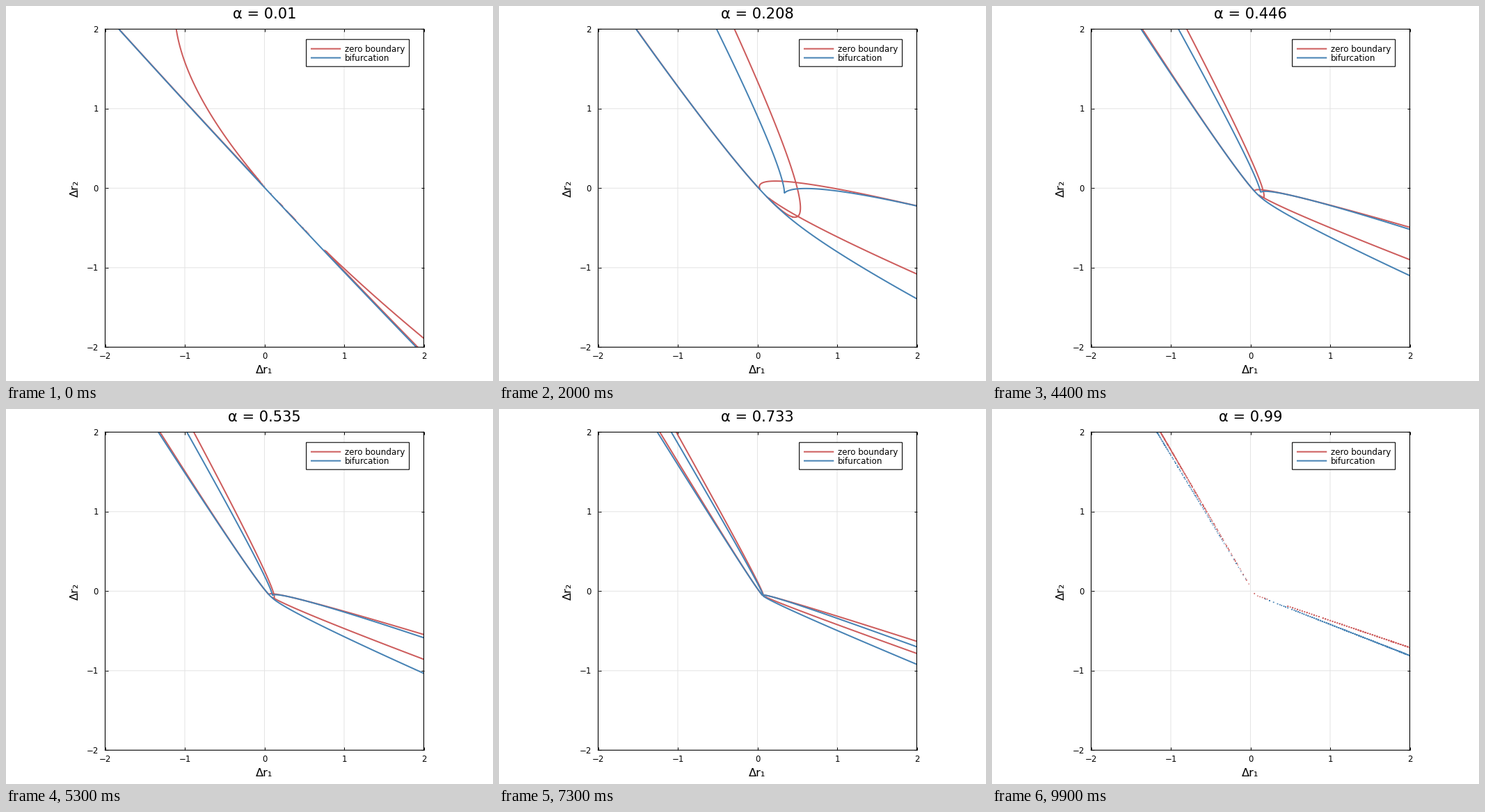
Write a matplotlib script that moves like this. It is 700x540 px and loops after 10 s.

```python
import numpy as np
import matplotlib.pyplot as plt
from matplotlib.animation import FuncAnimation
from matplotlib.patches import Rectangle
from matplotlib.lines import Line2D

W, H, DPI = 700, 540, 100
FRAMES, INTERVAL = 100, 100
RED, BLUE = "#cd5c5c", "#4682b4"
PT = 72 / DPI
CX, CY, UNIT = 371.5, 262.3, 114.5  # pixel of the plot's origin, pixels per unit

plt.rcParams["path.snap"] = False
plt.rcParams["path.simplify"] = False

# Growth rates as a quadratic map of the abundances (s, t):
# r = P0 + (1-alpha) * (A s + B t) + alpha * (AA s^2 + BB t^2 + AB s t)
P0 = np.array([0.0613, -0.05])
A, B = np.array([0.607, -0.648]), np.array([-0.2202, 0.2505])
AA, BB = np.array([-0.581, 1.0]), np.array([1.0, -0.34])
AB = np.array([-0.66, 0.66])

grid = np.linspace(-2, 2, 401)
X, Y = np.meshgrid(grid, grid)


def cross(p, q):
    return p[0] * q[1] - p[1] * q[0]


def parabola(lin, quad, r):
    """Zero on the curve lin*s + quad*s^2."""
    return cross(lin, r) * cross(lin, quad) - cross(quad, r) ** 2


def pencil():
    """Coefficients of det(M1 + z M2) for the pencil of the two conics."""
    mul = np.convolve
    a, b, c = A / 2, B / 2, AB / 2
    minor = mul(AA, BB) - mul(c, c)
    rest = 2 * mul(mul(c, a), b) - mul(AA, mul(b, b)) - mul(BB, mul(a, a))
    return minor, rest


MINOR, REST = pencil()


def fold(r):
    """Discriminant of the pencil: zero where two equilibria merge."""
    u, v = r
    n, k = MINOR, REST
    d = k[0] - u * n[0]
    c = k[1] - u * n[1] - v * n[0]
    b = k[2] - u * n[2] - v * n[1]
    a = k[3] - v * n[2]
    bb, cc, ad = b * b, c * c, a * d
    return (18 * ad * b * c - 4 * bb * b * d + bb * cc
            - 4 * a * cc * c - 27 * ad * ad)


fig = plt.figure(figsize=(W / DPI, H / DPI), dpi=DPI, facecolor="white")
ax = fig.add_axes([(CX - 2 * UNIT) / W, 1 - (CY + 2 * UNIT) / H,
                   4 * UNIT / W, 4 * UNIT / H])
ax.set_xlim(-2, 2)
ax.set_ylim(-2, 2)
ticks = range(-2, 3)
ax.set_xticks(ticks)
ax.set_yticks(ticks)
ax.tick_params(direction="in", top=True, right=True, length=4 * PT,
               width=PT, labelbottom=False, labelleft=False)
ax.set_axisbelow(True)
ax.grid(color="#e4e4e4", linewidth=PT)
for spine in ax.spines.values():
    spine.set_linewidth(1.1 * PT)
    spine.set_snap(False)
for line in (ax.get_xgridlines() + ax.get_ygridlines()
             + ax.get_xticklines() + ax.get_yticklines()):
    line.set_snap(False)


def label(x, y, text, size, ha="center", **kw):
    """Text with its baseline at pixel (x, y), measured from the top left."""
    return fig.text(x / W, 1 - y / H, text, fontsize=size * PT, ha=ha,
                    va="baseline", family="DejaVu Sans", color="black", **kw)


for i in ticks:
    name = str(i).replace("-", "\u2212")
    label(CX + UNIT * i, 507.5, name, 11.8)
    label(133, CY + 4.3 - UNIT * i, name, 11.8, ha="right")

title = label(CX, 18, "", 21)
label(CX, 529, "Δr₁", 16.3)
label(103.5, CY, "Δr₂", 16.3, rotation=90, rotation_mode="anchor")

# Legend
fig.add_artist(Rectangle((431.6 / W, 1 - 87.2 / H), 148 / W, 39 / H, fc="white",
                         ec="black", lw=1.1 * PT, zorder=5, snap=False))
for y, color, name in ((61.6, RED, "zero boundary"), (74.6, BLUE, "bifurcation")):
    fig.add_artist(Line2D([438 / W, 481.3 / W], [1 - y / H] * 2, color=color,
                          lw=2 * PT, solid_capstyle="butt", zorder=6, snap=False))
    label(486.6, y + 4.4, name, 11.87, ha="left", zorder=6)

curves = []


def update(i):
    while curves:
        curves.pop().remove()
    alpha = 0.01 + 0.98 * i / (FRAMES - 1)
    scale = (1 - alpha) ** 2 / alpha
    r = (X - P0[0]) / scale, (Y - P0[1]) / scale
    zero = parabola(A, AA, r) * parabola(B, BB, r)
    for z, color in ((zero, RED), (fold(r), BLUE)):
        cs = ax.contour(grid, grid, z, levels=[0], colors=color,
                        linewidths=2 * PT, linestyles="solid", zorder=2.2)
        cs.set(joinstyle="round", capstyle="round")
        curves.append(cs)
    title.set_text(f"α = {round(alpha, 3)}")
    return []


anim = FuncAnimation(fig, update, frames=FRAMES, interval=INTERVAL,
                     repeat=True, repeat_delay=0, blit=False)
plt.show()
```
